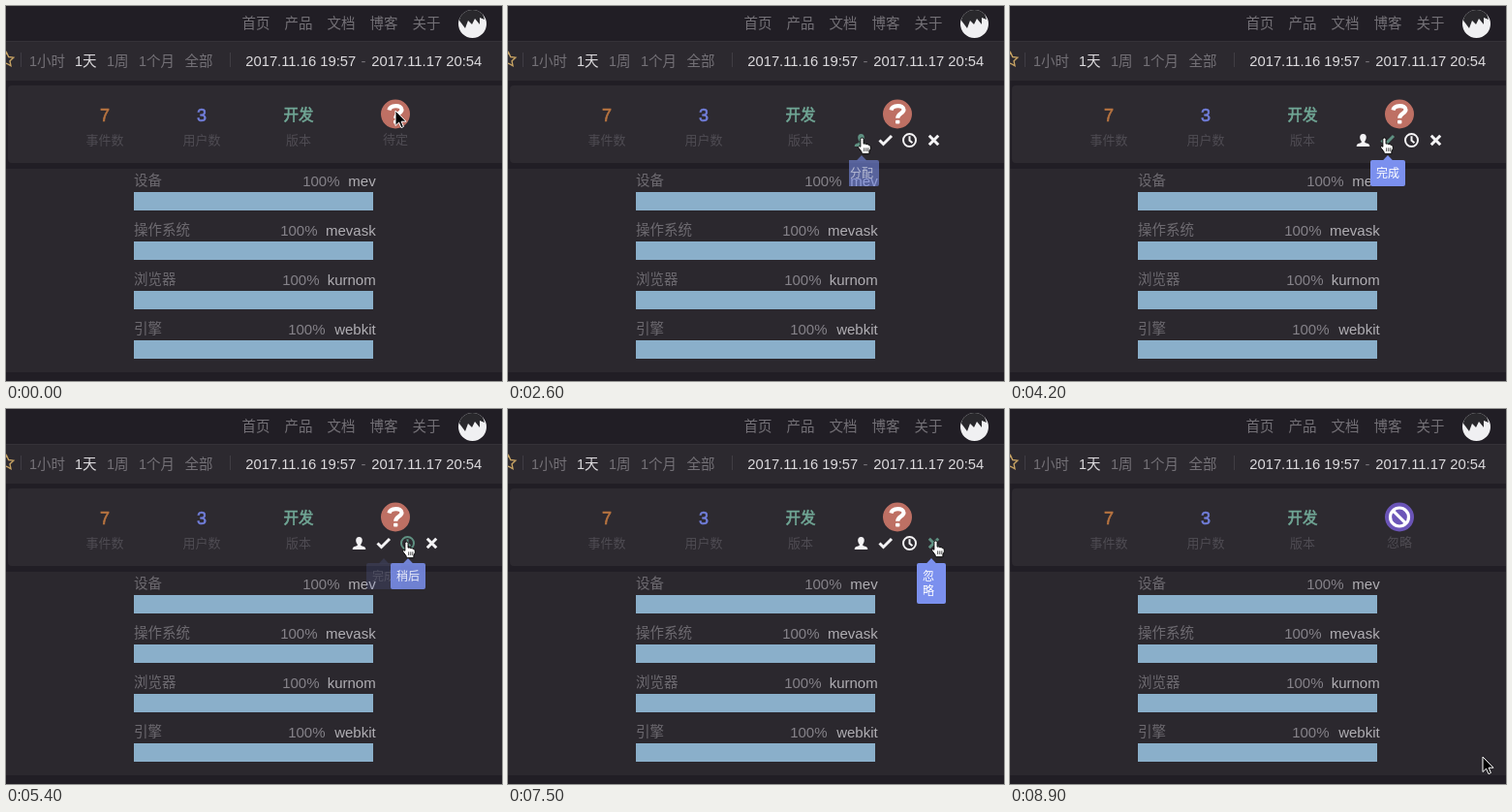
An HTML page with a canvas that plays this animation: 512 by 387 pixels, repeating every 9000 ms.

```html
<!DOCTYPE html>
<html lang="zh-CN">
<head>
<meta charset="utf-8">
<style>
html, body { margin: 0; width: 100%; height: 100%; overflow: hidden; background: #211e25; }
canvas { display: block; }
</style>
</head>
<body>
<canvas id="stage" width="512" height="387"></canvas>
<script>
const ctx = document.getElementById('stage').getContext('2d');
const LOOP = 9000, STEP = 100;
const FONT = '"Liberation Sans", "Noto Sans CJK SC", "Noto Sans CJK JP", sans-serif';
const GREY = '#747177', DIM = '#4f4c53', BRIGHT = '#dcdadd', HOVER = '#5f9182';
const ARROW = new Path2D('M0 0V15.5L3.6 12.1L6 17.6L8.4 16.5L6.1 11.2H11Z');
const HAND = new Path2D('M-2 9V1.5a1.5 1.5 0 0 1 3 0V6l1-.4 1.6.9 1.2-.2 1.2.9 1.2.3.6 1.2V11L6.5 13.5V16H-.5L-1 14-4 9.8c-.6-1.4 1-2 2-.8Z');
const FINGERS = new Path2D('M1.6 10v3.5M3.6 10v3.5M5.5 10v3.5');

// Cursor tip: time, x, y
const CURSOR = [
  [400, 402, 108], [900, 402, 117], [2000, 402, 117], [2300, 367, 136],
  [3500, 367, 136], [3800, 388, 136], [4500, 388, 136], [4700, 389, 137],
  [4800, 389, 137], [5100, 415, 137], [6200, 415, 137], [6300, 430, 127],
  [6500, 442, 136], [7400, 442, 136], [7500, 443, 136], [8200, 443, 136],
  [8500, 458, 214], [8600, 458, 214], [8900, 488, 359]
];

// Tooltips: centre, left, width, lines, fade-in and fade-out spans
const TIPS = [
  { cx: 365, x: 347, w: 36, lines: ['分配'], show: [2400, 2750], hide: [3600, 3900] },
  { cx: 390, x: 372, w: 36, lines: ['完成'], show: [3800, 4200], hide: [5100, 5450] },
  { cx: 415, x: 397, w: 36, lines: ['稍后'], show: [5100, 5450], hide: [6250, 6600] },
  { cx: 437, x: 422, w: 30, lines: ['忽', '略'], show: [6300, 6600], hide: [7800, 8100] }
];

const ramp = (t, [a, b]) => Math.min(1, Math.max(0, (t - a) / (b - a)));

function track(keys, t) {
  const next = keys.findIndex(k => k[0] >= t);
  if (next === 0) return keys[0].slice(1);
  if (next < 0) return keys[keys.length - 1].slice(1);
  const a = keys[next - 1], b = keys[next], p = ramp(t, [a[0], b[0]]);
  return [1, 2].map(i => a[i] + (b[i] - a[i]) * p);
}

function rect(x, y, w, h, color, radius = 0) {
  ctx.fillStyle = color;
  ctx.beginPath();
  ctx.roundRect(x, y, w, h, radius);
  ctx.fill();
}

function disc(x, y, r, color) {
  ctx.fillStyle = color;
  ctx.beginPath();
  ctx.arc(x, y, r, 0, 7);
  ctx.fill();
}

function line(d, color, width) {
  ctx.strokeStyle = color;
  ctx.lineWidth = width;
  ctx.stroke(new Path2D(d));
}

// y is the visual middle of the text; embolden adds a thin outline for a medium weight
function text(str, x, y, color, size = 14.5, align = 'left', embolden = 0) {
  ctx.font = `${size}px ${FONT}`;
  ctx.textAlign = align;
  ctx.fillStyle = ctx.strokeStyle = color;
  ctx.fillText(str, x, y + size * 0.365);
  if (embolden) {
    ctx.lineWidth = embolden;
    ctx.strokeText(str, x, y + size * 0.365);
  }
}

function avatar() {
  ctx.save();
  ctx.beginPath();
  ctx.arc(481.5, 18.5, 14.5, 0, 7);
  ctx.clip();
  rect(466, 3, 31, 31, '#f0f0f2');
  ctx.fillStyle = '#29282c';
  ctx.fill(new Path2D('M469 7Q480 1 491 5L494 14 489 12 489 19 484 13 481 19 477 15 474 23 468 15Z'));
  ctx.restore();
}

function star(cx, cy) {
  ctx.beginPath();
  for (let i = 0; i < 10; i++) {
    const a = i * Math.PI / 5 - Math.PI / 2, r = i % 2 ? 3.7 : 7.6;
    ctx.lineTo(cx + r * Math.cos(a), cy + r * Math.sin(a));
  }
  ctx.closePath();
  ctx.strokeStyle = '#c6a263';
  ctx.lineWidth = 1.4;
  ctx.stroke();
}

function page() {
  rect(0, 0, 512, 387, '#211e25');
  rect(0, 36, 512, 41, '#2c292f');
  rect(0, 36, 512, 1, '#353238');
  rect(2, 82, 514, 80, '#2d2a30', 4);
  rect(0, 168, 512, 210, '#2b282e');

  ['首页', '产品', '文档', '博客', '关于'].forEach((s, i) => text(s, 243.5 + i * 44, 18, GREY));
  avatar();

  star(0.5, 55.5);
  rect(15, 48, 1, 15, '#403d44');
  rect(231, 48, 1, 15, '#403d44');
  [['1小时', 24], ['1天', 71], ['1周', 104], ['1个月', 137], ['全部', 184.5]]
    .forEach(([s, x]) => text(s, x, 56.5, s === '1天' ? BRIGHT : GREY));
  text('2017.11.16 19:57', 247.2, 57, BRIGHT, 14.8);
  text('-', 366.5, 57, GREY, 14.8);
  text('2017.11.17 20:54', 377.2, 57, BRIGHT, 14.8);

  [['7', '事件数', '#b87440', 18], ['3', '用户数', '#727fdc', 18], ['开发', '版本', '#70a695', 15.5]]
    .forEach(([value, label, color, size], i) => {
      const x = 102 + i * 100;
      text(value, x, 112.7, color, size, 'center', 0.6);
      text(label, x, 138.5, DIM, 13, 'center');
    });

  [['设备', 'mev', 344.5], ['操作系统', 'mevask', 321.5], ['浏览器', 'kurnom', 323.5], ['引擎', 'webkit', 329.5]]
    .forEach(([label, name, x], i) => {
      const y = 180 + i * 51;
      text(label, 132, y, '#6d6a70');
      text('100%', x, y + 0.2, '#858289', 15, 'right');
      text(name, 381.7, y + 0.2, '#b0aeb3', 15, 'right');
      rect(132, y + 12, 247, 19, '#8aafca');
    });
}

function badge(t, ignored) {
  ctx.globalAlpha = 1 - 0.22 * (ramp(t, [400, 900]) - ramp(t, [2000, 2500]));
  disc(402, 111.5, 15, ignored ? '#6b55b8' : '#be7064');
  if (ignored) {
    line('M411.5 111.5a9.5 9.5 0 1 1-19 0a9.5 9.5 0 1 1 19 0M395.3 104.8L408.7 118.2', '#fff', 3.2);
  } else {
    line('M395.5 107.5C396.5 102 408.5 101.5 408.5 107C408.5 111 402.2 110.5 402.2 115.8', '#fff', 4.2);
    rect(400, 117.8, 4.4, 3.8, '#fff', 1);
  }
  ctx.globalAlpha = 1;
}

function icons(mx, my) {
  const color = cx => my > 130 && Math.abs(mx - cx) < 9 ? HOVER : '#f4f3f5';
  ctx.fillStyle = color(364);
  ctx.fill(new Path2D('M364.5 132C368.5 132 368.5 137 366.3 139.6V141L370 142.3Q371.3 143 371.3 145H357.7Q357.7 143 359 142.3L362.7 141V139.6C360.5 137 360.5 132 364.5 132Z'));
  line('M383.5 138.5L387.5 142.5L396 134', color(389), 3);
  line('M421 138.5a6.5 6.5 0 1 1-13 0a6.5 6.5 0 1 1 13 0M414.5 134.3V138.7L417.5 141.3', color(414.5), 2);
  line('M434.8 133.8L444.2 143.2M444.2 133.8L434.8 143.2', color(439.5), 3);
}

function tooltip({ cx, x, w, lines, show, hide }, t) {
  ctx.globalAlpha = ramp(t, show) * (1 - ramp(t, hide));
  rect(x, 159, w, 12 + lines.length * 15, '#7b90ee', 2);
  ctx.fill(new Path2D(`M${cx - 5} 159.2L${cx} 154L${cx + 5} 159.2Z`));
  lines.forEach((s, i) => text(s, x + 6, 172.3 + i * 15, '#fff', 12));
}

function cursor(x, y, hand) {
  ctx.save();
  ctx.translate(x, y);
  if (hand) {
    ctx.translate(-1, 0);
    ctx.scale(1.06, 1.04);
  }
  ctx.lineWidth = hand ? 0.9 : 1;
  ctx.fillStyle = hand ? '#fff' : '#000';
  ctx.strokeStyle = hand ? '#000' : '#fff';
  ctx.fill(hand ? HAND : ARROW);
  ctx.stroke(hand ? HAND : ARROW);
  ctx.lineWidth = 0.7;
  if (hand) ctx.stroke(FINGERS);
  ctx.restore();
}

function draw(now) {
  const t = Math.floor(now % LOOP / STEP) * STEP;
  const [mx, my] = track(CURSOR, t);
  const ignored = t >= 8000;
  page();
  badge(t, ignored);
  if (t >= 1400 && !ignored) icons(mx, my);
  else text(ignored ? '忽略' : '待定', 402, 137.5, DIM, 13, 'center');

  ctx.save();
  ctx.beginPath();
  ctx.rect(352, 150, 100, 60);
  ctx.clip();
  TIPS.forEach(tip => tooltip(tip, t));
  ctx.restore();

  cursor(mx, my, t >= 700 && t < 8300);
}

const start = performance.now();
function tick() {
  draw(performance.now() - start);
  requestAnimationFrame(tick);
}
tick();
</script>
</body>
</html>
```
